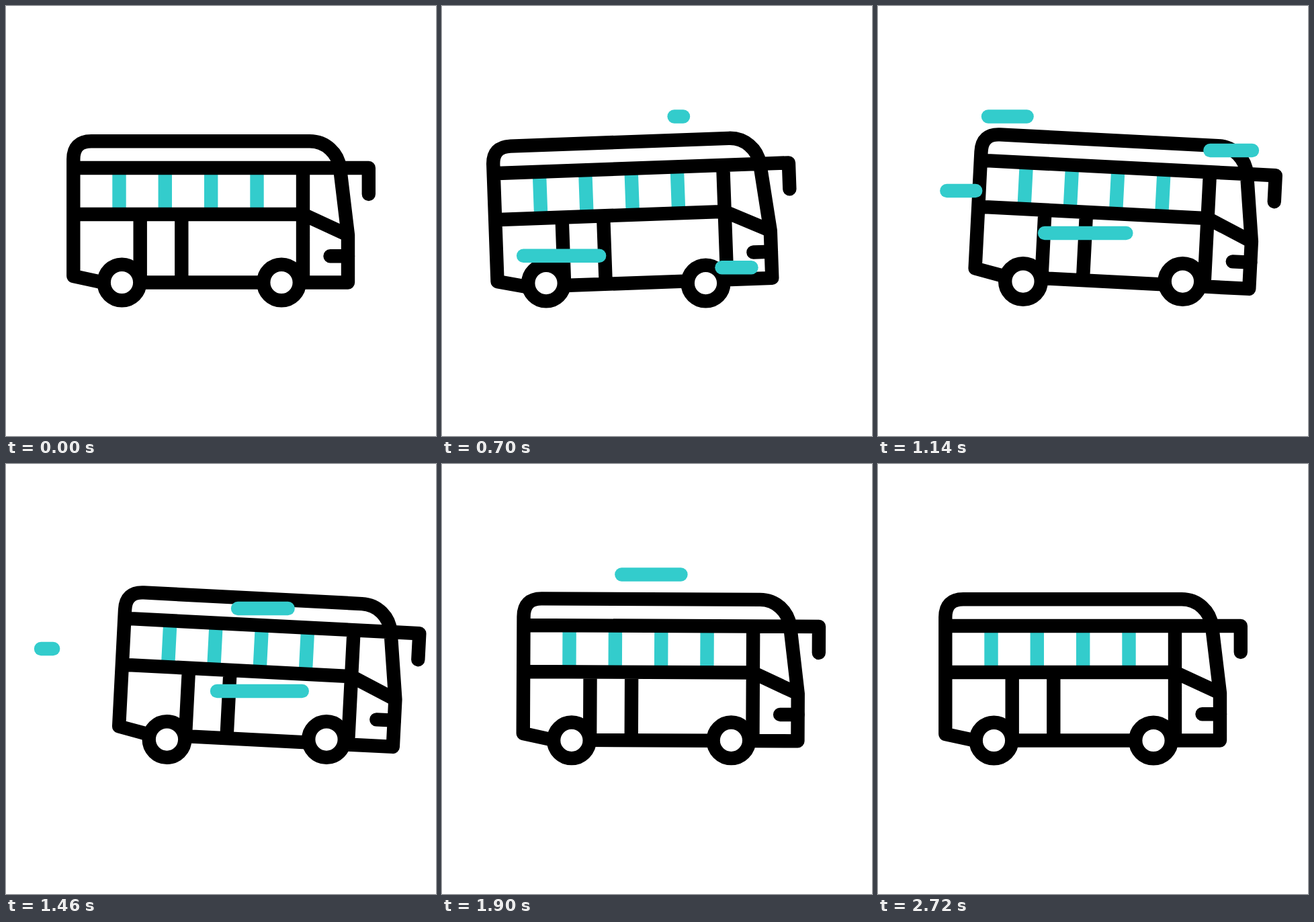
Write an HTML page that moves like this. It is 640 px wide and 640 px high and loops after 2800 ms.

```html
<!DOCTYPE html>
<html lang="en">
<head>
<meta charset="utf-8">
<title>Bus</title>
<style>
  html, body { margin: 0; width: 100%; height: 100%; overflow: hidden; background: #fff; }
  svg { display: block; width: 100vw; height: 100vh; }
  .ink { fill: none; stroke: #000; stroke-width: 20.4; stroke-linejoin: round; }
  .teal { fill: none; stroke: #33cccc; stroke-width: 20.4; }
  .round { stroke-linecap: round; }
  #wheels { fill: #fff; }
</style>
</head>
<body>
<svg viewBox="0 0 640 640">
  <g id="body">
    <path class="teal" d="M168.5 246V305M236.8 246V305M305.2 246V305M373.5 246V305"/>
    <path class="ink" d="M142 411L100.3 402V228Q100.3 201.3 127 201.3H452C476 201.3 494 219 497 241L509 341V411.5H440
      M200 411.5H385M100 241H497M100 310H442L509 341M442 241V411M199.7 310V402M261.3 310V411"/>
    <path class="ink round" d="M497 241H539.8V280M509 372.2H482.5"/>
  </g>
  <g id="wheels" class="ink">
    <circle cx="172.5" cy="411.5" r="26.8"/>
    <circle cx="410" cy="411.5" r="26.8"/>
  </g>
  <g id="wind" class="teal round"></g>
</svg>
<script>
const LOOP = 2800, STEP = 20, SWEEP = 500, LAG = 200;
const PIVOT = '305 413';

// [time, value] keys, eased between neighbours
const shiftKeys = [[200, 0], [620, -20], [1410, 67], [1460, 67], [2300, -20], [2720, 0]];
const tiltKeys = [[200, 0], [600, -3], [1000, 2.94], [1460, 2.94], [2000, 0], [2420, 2.1], [2720, 0]];

// Each streak sweeps from right to left, once per start time
const streaks = [
  { y: 164.5, left: 164, right: 359, starts: [620, 1660] },
  { y: 215, left: 345, right: 557, starts: [960, 1900] },
  { y: 275, left: 52, right: 147, starts: [900] },
  { y: 338, left: 232, right: 465, starts: [720, 1160] },
  { y: 371.8, left: 55, right: 259.5, starts: [390] },
  { y: 389.3, left: 408, right: 489, starts: [300] }
];

const body = document.getElementById('body');
const wheels = document.getElementById('wheels');
const wind = document.getElementById('wind');

const ease = u => {
  u = Math.min(1, Math.max(0, u));
  return u * u * (3 - 2 * u);
};

function valueAt(keys, t) {
  let value = keys[0][1];
  for (let i = 1; i < keys.length; i++) {
    const [t0, a] = keys[i - 1], [t1, b] = keys[i];
    if (t >= t0) value = a + (b - a) * ease((t - t0) / (t1 - t0));
  }
  return value;
}

const sweeps = streaks.flatMap(({ starts, ...streak }) => starts.map(start => {
  const path = document.createElementNS('http://www.w3.org/2000/svg', 'path');
  wind.append(path);
  return { ...streak, start, path };
}));

function drawSweep({ y, left, right, start, path }, t) {
  const age = t - start;
  const visible = age > 0 && age < SWEEP + LAG;
  path.style.display = visible ? '' : 'none';
  if (!visible) return;
  const at = time => right - (right - left) * ease(time / SWEEP);
  path.setAttribute('d', `M${at(age)} ${y}H${at(age - LAG)}`);
}

function draw(t) {
  const x = valueAt(shiftKeys, t), tilt = valueAt(tiltKeys, t);
  body.setAttribute('transform', `translate(${x} ${-tilt * 0.35}) rotate(${tilt} ${PIVOT})`);
  wheels.setAttribute('transform', `translate(${x} ${-tilt / 2})`);
  sweeps.forEach(sweep => drawSweep(sweep, t));
}

// The picture holds for one STEP at a time
const begin = performance.now();
function tick() {
  const t = (performance.now() - begin) % LOOP;
  draw(Math.floor(t / STEP) * STEP);
  requestAnimationFrame(tick);
}
tick();
</script>
</body>
</html>
```
